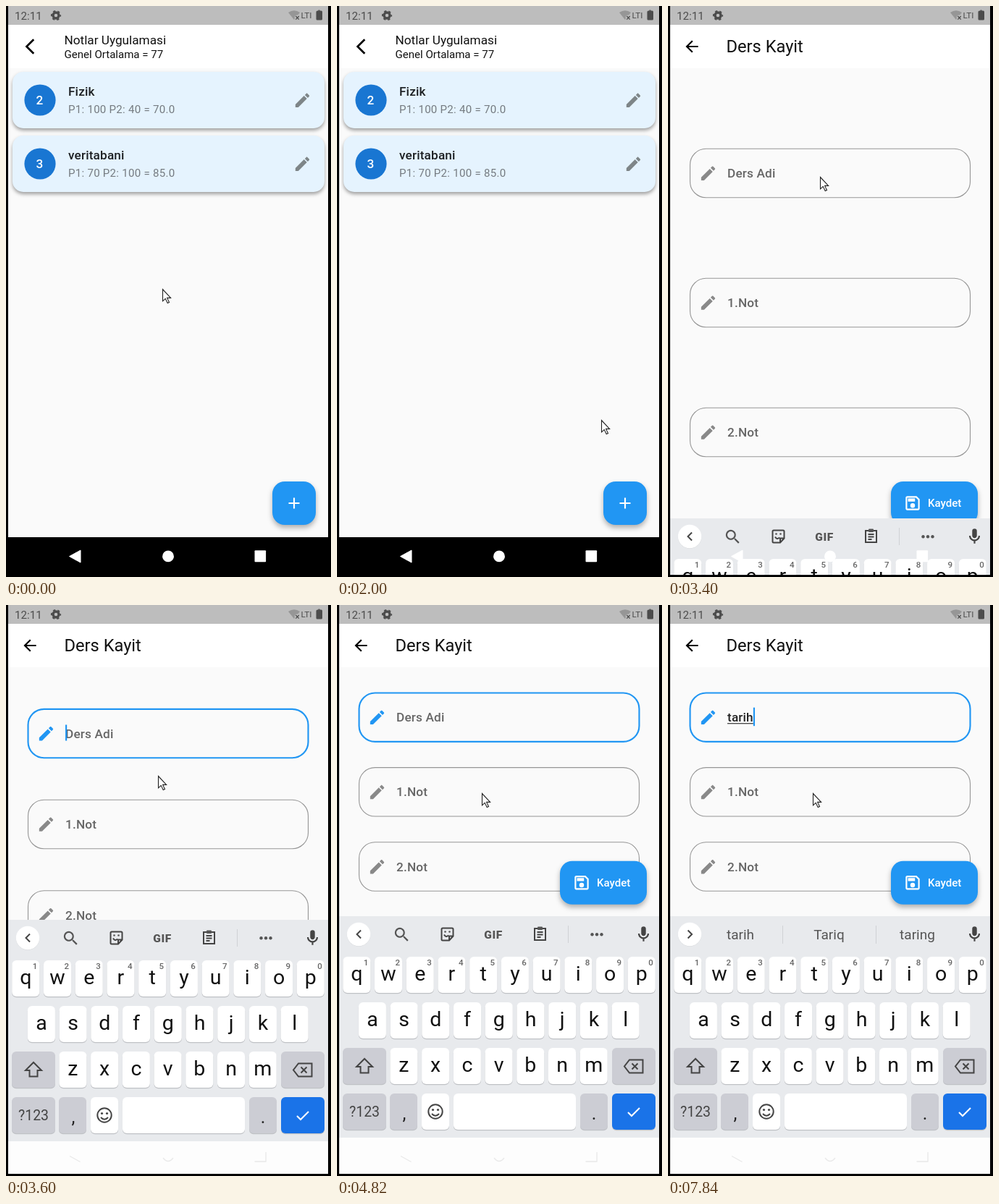
Animation, 449 px wide and 789 px high, one loop 8 s. Source, as an HTML page:

```html
<!DOCTYPE html>
<html lang="tr">
<head>
<meta charset="utf-8">
<title>Notlar Uygulamasi</title>
<style>
  html, body { margin: 0; width: 100%; height: 100%; overflow: hidden; background: #000; }
  svg { display: block; width: 100%; height: 100%; font-family: Roboto, sans-serif; }
  text { white-space: pre; }
  .mid { text-anchor: middle; }
  .bold { font-weight: 500; }
  .title { font-size: 17.2px; font-weight: 500; letter-spacing: .16px; }
  .sub { font-size: 15.05px; letter-spacing: .27px; fill: #757b80; }
  .card { fill: #e5f3fe; filter: drop-shadow(0 3px 2.5px rgba(0,0,0,.36)); }
  .fab { fill: #2196f3; filter: drop-shadow(0 4px 3.5px rgba(0,0,0,.3)); }
  .key { fill: #fff; }
  .key.dark { fill: #cccdd4; }
  .key.enter { fill: #1a73e8; }
  .line { fill: none; stroke: #444; stroke-width: 2; }
</style>
</head>
<body>
<svg id="stage" viewBox="0 0 449 789"></svg>
<script>
const LOOP = 8000;
const DP = 1.075;

const ICONS = {
  back: 'M20 11H7.83l5.59-5.59L12 4l-8 8 8 8 1.41-1.41L7.83 13H20z',
  chevron: 'M17.77 3.77L16 2 6 12l10 10 1.77-1.77L9.54 12z',
  edit: 'M3 17.25V21h3.75L17.81 9.94l-3.75-3.75zM20.71 7.04c.39-.39.39-1.02 0-1.41l-2.34-2.34c-.39-.39-1.02-.39-1.41 0l-1.83 1.83 3.75 3.75z',
  add: 'M19 13h-6v6h-2v-6H5v-2h6V5h2v6h6z',
  save: 'M17 3H5c-1.1 0-2 .9-2 2v14c0 1.1.9 2 2 2h14c1.1 0 2-.9 2-2V7zm2 16H5V5h11.17L19 7.83zm-7-7a3 3 0 1 0 0 6 3 3 0 1 0 0-6zM6 6h9v4H6z',
  search: 'M15.5 14h-.79l-.28-.27A6.5 6.5 0 1 0 13.73 14.43l.27.28v.79l5 4.99L20.49 19zm-6 0a4.5 4.5 0 1 1 0-9 4.5 4.5 0 1 1 0 9z',
  mic: 'M12 14c1.66 0 3-1.34 3-3V5a3 3 0 0 0-6 0v6c0 1.66 1.34 3 3 3zm5-3a5 5 0 0 1-10 0H5c0 3.53 2.61 6.43 6 6.92V21h2v-3.08c3.39-.49 6-3.39 6-6.92z'
};

const icon = (name, cx, cy, fill) =>
  `<path d="${ICONS[name]}" fill="${fill}" fill-rule="evenodd" transform="translate(${cx - 12 * DP} ${cy - 12 * DP}) scale(${DP})"/>`;
const text = (str, x, y, cls = '', size = '', fill = '#111') =>
  `<text x="${x}" y="${y}" class="${cls}" fill="${fill}" ${size && `font-size="${size}"`}>${str}</text>`;
const rect = (x, y, w, h, attrs = '') =>
  `<rect x="${x}" y="${y}" width="${w}" height="${h}" ${attrs}/>`;
const circle = (cx, cy, r, attrs = '') => `<circle cx="${cx}" cy="${cy}" r="${r}" ${attrs}/>`;
const path = (d, attrs = 'class="line"') => `<path d="${d}" ${attrs}/>`;

function statusBar() {
  return rect(3, 0, 442, 26, 'fill="#bdbdbd"')
    + text('12:11', 12, 18.7, '', 15.2, '#4c4c4c')
    + circle(69, 13, 4, 'fill="none" stroke="#4c4c4c" stroke-width="3.4"')
    + circle(69, 13, 6.1, 'fill="none" stroke="#4c4c4c" stroke-width="2" stroke-dasharray="3.2 3.19" stroke-dashoffset="1.6"')
    + path('M390 9Q398 3.5 406 9L398 19z', 'fill="#969696"')
    + circle(402.5, 16.3, 3.8, 'fill="#bdbdbd"')
    + path('M400.3 14l4.4 4.6m0-4.6l-4.4 4.6', 'stroke="#4c4c4c" stroke-width="1.3"')
    + text('LTI', 407.5, 17, '', 11.7, '#4c4c4c')
    + path('M430.5 6.5h1V5.500h2v1h2q1.500 0 1.500 1.500v10q0 1.500-1.500 1.500h-5.500q-1.500 0-1.500-1.500v-10q0-1.500 2-1.500z', 'fill="#4c4c4c"');
}

const page = () => rect(3, 86, 442, 648, 'fill="#fafafa"') + rect(3, 26, 442, 60, 'fill="#fff"');

function card(y, number, name, detail) {
  return rect(9, y, 431, 78, 'rx="15" class="card"')
    + circle(47, y + 39, 21.6, 'fill="#1976d2"')
    + text(number, 46.5, y + 44.7, 'mid bold', 17.2, '#fff')
    + text(name, 86, y + 33.2, 'title', '', '#1d2023')
    + text(detail, 86, y + 57, 'sub')
    + icon('edit', 409.5, y + 39.3, '#7e8588');
}

function listPage() {
  return page()
    + icon('chevron', 33, 56, '#000')
    + text('Notlar Uygulamasi', 80.5, 53, '', 17.2)
    + text('Genel Ortalama = 77', 80.5, 72, '', 15.05)
    + card(91, 2, 'Fizik', 'P1: 100 P2: 40 = 70.0')
    + card(179, 3, 'veritabani', 'P1: 70 P2: 100 = 85.0')
    + rect(368, 657, 60, 60, 'rx="17" class="fab"')
    + icon('add', 398, 687, '#fff');
}

// Each field is drawn around its own vertical centre.
function field(label, i) {
  return `<g id="field${i}" stroke="none">`
    + rect(30.5, -33.7, 387, 67.4, 'class="box" rx="22" fill="none"')
    + `<g class="pen">${icon('edit', 55.5, 0.2, 'currentColor')}</g>`
    + text(label, 82, 6, 'title label', '', '#666') + '</g>';
}

function formPage() {
  return page()
    + icon('back', 33, 56, '#000')
    + text('Ders Kayit', 80.5, 64, '', 23.65)
    + ['Ders Adi', '1.Not', '2.Not'].map(field).join('')
    + '<g id="save">' + rect(308, 0, 120, 60, 'rx="17" class="fab"')
    + icon('save', 338, 30, '#fff')
    + text('Kaydet', 359, 35.2, 'bold', 15.05, '#fff') + '</g>'
    + '<text id="typed" class="title" x="82" y="161" fill="#222"></text>'
    + rect(82, 163.2, 0, 1.1, 'id="underline" fill="#222"')
    + rect(82, 0, 2.2, 22, 'id="caret" fill="#2196f3"');
}

function key(x, y, w, cls = '') {
  return rect(x, y + 1.2, w, 50, 'rx="6" fill="#bfc1c5"') + rect(x, y, w, 50, `rx="6" class="key ${cls}"`);
}

function letters(row, x, y, digits) {
  return [...row].map((ch, i) => {
    const cx = x + i * 43.72;
    return key(cx - 19, y, 38) + text(ch, cx, y + 33, 'mid', 28.5)
      + (digits ? text((i + 1) % 10, cx + 12.7, y + 12.3, 'mid bold', 11.5, '#666') : '');
  }).join('');
}

function toolbar() {
  const grey = 'fill="#555"';
  return path('M33 449.500l-5.500 5.500 5.500 5.500')
    + icon('search', 89.5, 455.5, '#555')
    + path('M146 446.500h13q1.500 0 1.500 1.500v9.500l-5.500 6h-9q-1.500 0-1.500-1.500v-14q0-1.500 1.500-1.500zM160 457.500h-5v5.500M148 455.500q2.500 4.500 6 1')
    + circle(149.5, 451.5, 1.3, grey) + circle(155.5, 451.5, 1.3, grey)
    + text('GIF', 216, 460.5, 'mid', 15.5, '#555').replace('<text', '<text font-weight="900" letter-spacing=".6"')
    + path('M273 447h15v16h-15zM276.500 452h8m-8 3.500h8m-8 3.500h5')
    + rect(277, 444.5, 7, 4.5, 'rx="1" fill="#555"')
    + rect(319, 443, 1, 24, 'fill="#cfd1d5"')
    + [352.5, 359, 365.5].map(x => circle(x, 455.3, 2.2, grey)).join('');
}

function suggestions() {
  return path('M27.500 449.500l5.500 5.500-5.500 5.500')
    + [100, 222.5, 344.5].map(x => text('', x, 462, 'mid word', 19, '#555')).join('')
    + [158, 287].map(x => rect(x, 443, 1, 25, 'fill="#cfd1d5"')).join('');
}

function keyboard() {
  return rect(3, 430, 442, 306, 'fill="#e8eaed"')
    + rect(3, 736, 442, 60, 'fill="#fdfdfd"')
    + circle(30, 455.5, 16.2, 'fill="#d5d7da"') + circle(30, 455, 16.2, 'fill="#fff"')
    + `<g id="tools">${toolbar()}</g><g id="words">${suggestions()}</g>`
    + icon('mic', 423.5, 455, '#444')
    + letters('qwertyuiop', 27.3, 486, true)
    + letters('asdfghjkl', 48.9, 549)
    + letters('zxcvbnm', 92.4, 612)
    + key(8, 612, 60, 'dark') + path('M38 627l11 11h-5.500v8.500h-11v-8.500h-5.500z')
    + key(380, 612, 60, 'dark') + path('M404 628.500h18.500v18h-18.500l-7-9zM407.500 633.500l8 8m0-8l-8 8')
    + key(8, 675, 60, 'dark') + text('?123', 38, 707.3, 'mid', 19.4, '#444')
    + key(73, 675, 38, 'dark') + text(',', 93, 710.5, 'mid', 25, '#222')
    + key(117, 675, 38) + circle(136, 700, 9.7, 'class="line"')
    + circle(132.5, 697.5, 1.6, 'fill="#444"') + circle(139.5, 697.5, 1.6, 'fill="#444"')
    + path('M131 703q5 5.500 10 0')
    + key(161, 675, 169)
    + key(336, 675, 38, 'dark') + text('.', 355, 710.5, 'mid', 25, '#222')
    + key(380, 675, 60, 'enter') + path('M402 701l5 5 11-11', 'fill="none" stroke="#fff" stroke-width="2.1"');
}

function navButtons() {
  return '<g id="nav" fill="#fff">'
    + path('M87.500 760.500L103 752v17z', 'stroke="#fff" stroke-linejoin="round"')
    + circle(224, 760.4, 7.9) + rect(343.5, 752.3, 15.6, 16, 'rx="1"') + '</g>'
    + path('M88 761.500l14.500 8M217 764q7 9 14 0M343.500 769h15.500v-13', 'id="ghost" fill="none" stroke="#e9e9e9" stroke-width="1.3"');
}

document.getElementById('stage').innerHTML =
  '<clipPath id="screen">' + rect(3, 0, 442, 786) + '</clipPath>'
  + rect(0, 0, 449, 789) + '<g clip-path="url(#screen)">'
  + listPage() + `<g id="form">${formPage()}</g>` + statusBar()
  + `<g id="keyboard">${keyboard()}</g>` + navButtons() + '</g>'
  + path('M.5 .5v16.300l3.700-3.500 3 6.200 2.300-1.100-2.900-6h5z', 'id="pointer" fill="#fff" stroke="#222" stroke-width="1.1"');

// Held steps: [start in ms, value]
const tracks = {
  pointer: [[0, [216, 391]], [380, [232, 412]], [600, [288, 492]], [800, [352, 584]], [1000, [402, 656]],
    [1200, [423, 677]], [1400, [412, 676]], [1800, [396, 648]], [2000, [365, 572]], [2200, [292, 412]],
    [2400, [234, 288]], [2600, [212, 240]], [2800, [209, 232]], [3200, [210, 236]], [4000, [200, 260]]],
  form: [[0, 0], [2200, .5], [2400, 1]],
  bottom: [[0, 734], [3600, 520], [3800, 430.7]],
  slide: [[0, 400], [3400, 278], [3600, 5], [3800, 0]],
  focus: [[0, false], [3600, true]],
  caret: [[0, 0], [3600, 1], [4000, 0], [4420, 1], [4820, 0], [5420, 1], [5820, 0], [6420, 1]],
  label: [[0, 1], [6420, .6], [6620, .13], [6820, 0]],
  typed: [[0, ''], [6420, 't'], [7020, 'ta'], [7220, 'tar'], [7420, 'tari'], [7620, 'tarih']],
  words: [[0, ''], [6620, 't thanks thank'], [7020, 'ta take taking'], [7220, 'tar tart target'],
    [7420, 'tari Tariq taring'], [7840, 'tarih Tariq taring']]
};
const at = (name, t) => tracks[name].findLast(step => step[0] <= t)[1];

const el = id => document.getElementById(id);
const set = (node, attrs) => Object.entries(attrs).forEach(([k, v]) => node.setAttribute(k, v));
const move = (id, x, y) => set(el(id), { transform: `translate(${x} ${y})` });
const show = (id, on) => set(el(id), { opacity: Number(on) });

function render(t) {
  const bottom = at('bottom', t), slide = at('slide', t), focus = at('focus', t);
  const gap = (bottom - 86 - 3 * 68) / 4;
  const centre = i => 120 + gap + i * (gap + 68);

  move('pointer', ...at('pointer', t));
  show('form', at('form', t));
  for (let i = 0; i < 3; i++) {
    const active = focus && i === 0;
    const node = el('field' + i);
    move('field' + i, 0, centre(i));
    set(node.querySelector('.box'), { stroke: active ? '#2196f3' : '#969696', 'stroke-width': active ? 2.15 : 1.1 });
    set(node.querySelector('.pen'), { color: active ? '#2196f3' : '#898989' });
  }
  set(el('field0').querySelector('.label'), { opacity: at('label', t) });
  move('save', 0, bottom - 77);
  move('keyboard', 0, slide);
  show('nav', slide > 100);
  show('ghost', slide < 100);

  const typed = at('typed', t), words = at('words', t);
  el('typed').textContent = typed;
  const width = typed ? el('typed').getComputedTextLength() : 0;
  set(el('underline'), { width });
  set(el('caret'), {
    x: 82 + width, y: centre(0) - (typed ? 13.5 : 12), height: typed ? 25.5 : 22, opacity: at('caret', t)
  });
  show('tools', !words);
  show('words', words);
  const list = words.split(' ');
  document.querySelectorAll('.word').forEach((node, i) => { node.textContent = list[i] || ''; });
  set(el('words'), { opacity: words ? 1 : 0 });
}

const start = performance.now();
function tick() {
  render((performance.now() - start) % LOOP);
  requestAnimationFrame(tick);
}
tick();
</script>
</body>
</html>
```
